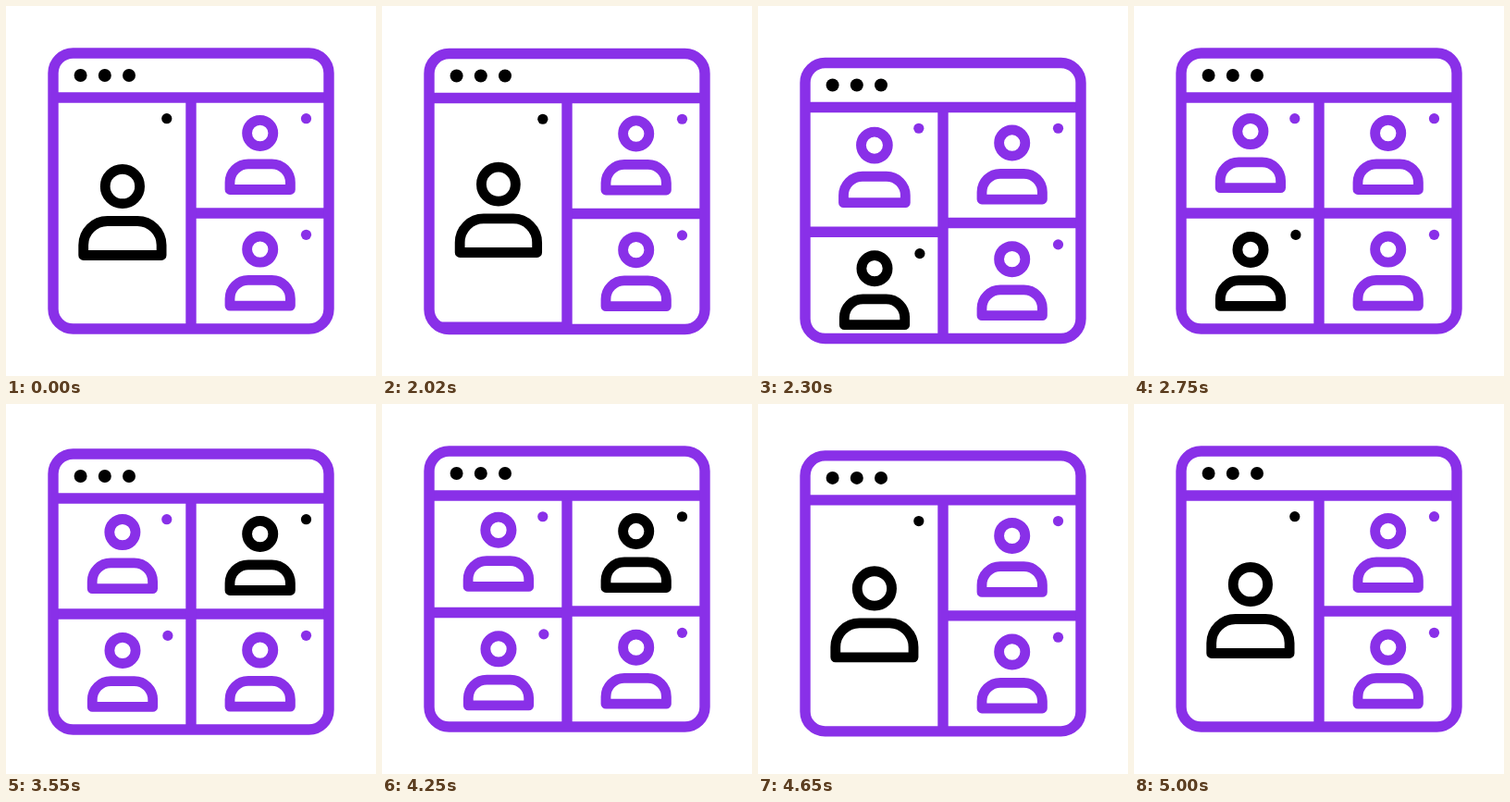
An HTML page with a canvas for the animation above (5020 ms loop, 400 px wide and 400 px high).

```html
<!DOCTYPE html>
<html lang="en">
<head>
<meta charset="utf-8">
<title>Video call layout</title>
<style>
  html, body { margin: 0; height: 100%; overflow: hidden; background: #fff; }
  canvas { display: block; width: 100vw; height: 100vh; }
</style>
</head>
<body>
<canvas id="stage" width="400" height="400"></canvas>
<script>
const ctx = document.getElementById('stage').getContext('2d');
const LOOP = 5020, SPLIT = 2000, SWAP = 3325, MERGE = 4245;
const PURPLE = [137, 48, 232], BLACK = [0, 0, 0];

const clamp = x => Math.min(1, Math.max(0, x));
const lerp = (a, b, p) => a + (b - a) * p;
const between = (t, a, b) => t >= a && t < b;

function bezier(x1, y1, x2, y2) {
  const at = (a, b, u) => 3 * a * u * (1 - u) ** 2 + 3 * b * u * u * (1 - u) + u ** 3;
  return x => {
    if (x <= 0 || x >= 1) return clamp(x);
    let lo = 0, hi = 1;
    for (let i = 0; i < 24; i++) {
      const mid = (lo + hi) / 2;
      if (at(x1, x2, mid) < x) lo = mid; else hi = mid;
    }
    return at(y1, y2, lo);
  };
}
const glide = bezier(.2, .15, .25, 1);
const dip = bezier(.25, 0, .5, 1);
const settle = bezier(.25, .1, .25, 1);

const move = (t, start) => glide((t - start) / 460);
const fade = (t, start) => clamp((t - start - 60) / 120);
const bounce = (t, start) => dip((t - start) / 225) - settle((t - start - 225) / 500);
const mix = p => `rgb(${BLACK.map((c, i) => Math.round(lerp(c, PURPLE[i], p)))})`;

function dot(x, y, r, color) {
  ctx.fillStyle = color;
  ctx.beginPath();
  ctx.arc(x, y, r, 0, 7);
  ctx.fill();
}

function line(x1, y1, x2, y2) {
  ctx.beginPath();
  ctx.moveTo(x1, y1);
  ctx.lineTo(x2, y2);
  ctx.stroke();
}

// big: 0 is the small tile size, 1 the full-height size
function person(x, y, color, big = 0) {
  const half = lerp(32.7, 42.2, big), top = y + lerp(33.3, 37.5, big);
  const base = y + lerp(61, 74.5, big), r = lerp(20, 26, big);
  ctx.strokeStyle = color;
  ctx.lineWidth = 10.8;
  ctx.beginPath();
  ctx.arc(x, y, lerp(14.1, 18.7, big), 0, 7);
  ctx.stroke();
  ctx.beginPath();
  ctx.moveTo(x - half, base);
  ctx.arcTo(x - half, top, x, top, r);
  ctx.arcTo(x + half, top, x + half, base, r);
  ctx.lineTo(x + half, base);
  ctx.closePath();
  ctx.stroke();
}

function windowPath() {
  ctx.beginPath();
  ctx.roundRect(51, 51, 298, 298, 21.5);
}

function draw(t) {
  const purple = mix(1);
  const split = move(t, SPLIT) - move(t, MERGE);
  const swap = fade(t, SWAP);
  const merge = fade(t, MERGE);
  const firstColor = mix(fade(t, SPLIT) - merge);
  const lowerColor = mix(swap);
  const rightColor = mix(1 - swap + merge);
  const drop = 129 * (1 - split);

  ctx.fillStyle = '#fff';
  ctx.fillRect(0, 0, 400, 400);
  ctx.save();
  ctx.translate(0, 13 * (bounce(t, SPLIT) + bounce(t, MERGE)) + 3 * bounce(t, SWAP));
  ctx.lineJoin = 'round';

  // left column, where the lower tile slides in from the bottom edge
  ctx.save();
  windowPath();
  ctx.clip();
  person(125.9, lerp(195, 135.6, split), firstColor, 1 - split);
  dot(173.8, 121.7, 5.6, firstColor);
  person(126, 263.4 + drop, lowerColor);
  if (!between(t, 2950, 3100)) dot(174.9, 247.4 + drop, 5.6, lowerColor);
  ctx.strokeStyle = purple;
  ctx.lineWidth = 11.4;
  line(51, 224 + drop, 200, 224 + drop);
  ctx.restore();

  person(274.7, 137.5, rightColor);
  if (!between(t, 3920, 4100)) dot(324.5, 121.7, 5.6, rightColor);
  person(274.7, 263.1, purple);
  dot(324.5, 247.3, 5.6, purple);

  ctx.strokeStyle = purple;
  ctx.lineWidth = 11.4;
  line(200, 224, 349, 224);
  line(200, 99, 200, 349);
  line(51, 99, 349, 99);
  windowPath();
  ctx.stroke();
  for (const x of [80.6, 106.8, 133]) dot(x, 75, 7, mix(0));
  ctx.restore();
}

function tick() {
  draw(performance.now() % LOOP);
  requestAnimationFrame(tick);
}
tick();
</script>
</body>
</html>
```
